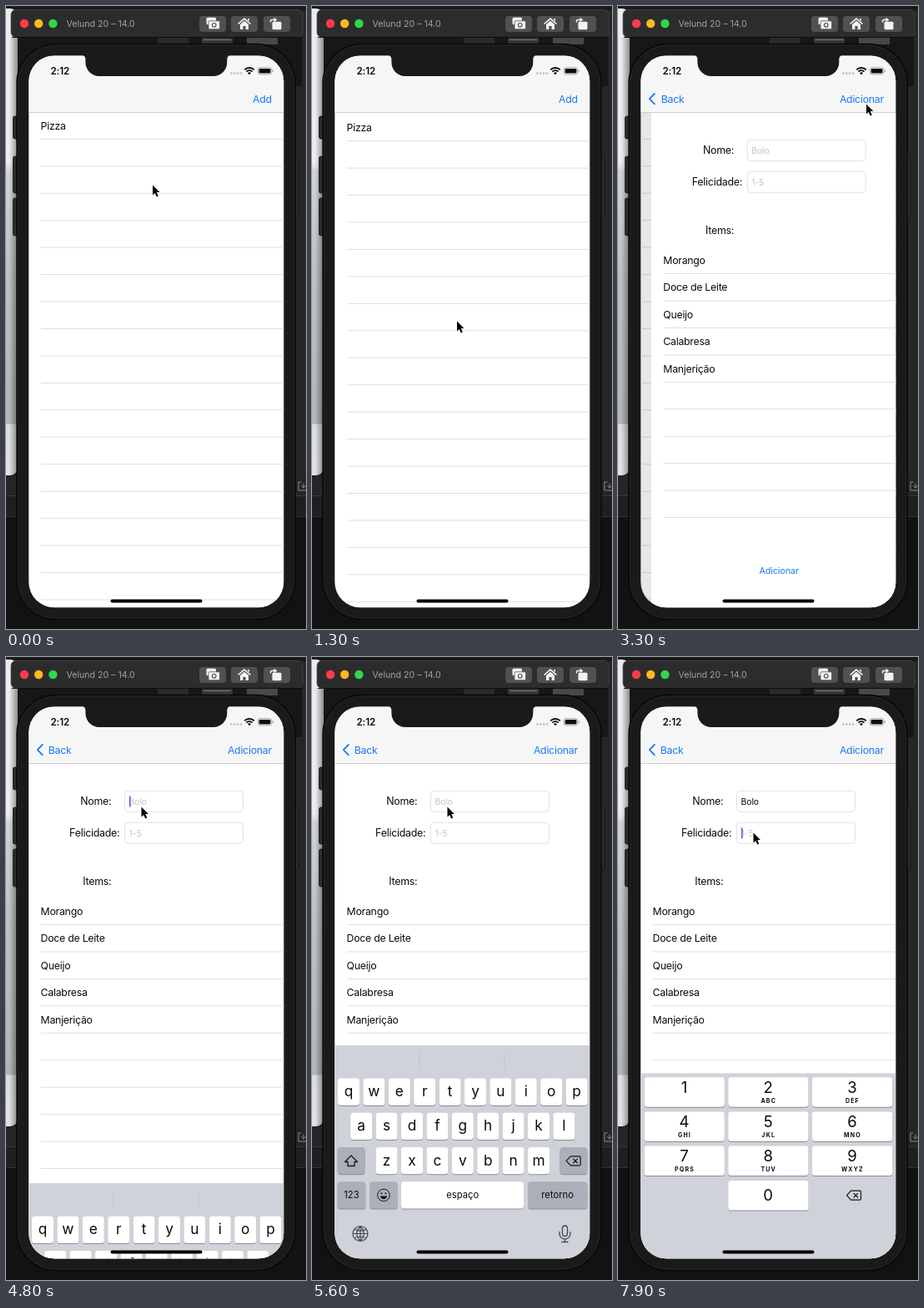
These frames come from a looping animation (360 px wide and 746 px high, 8 s). An HTML page with a canvas:

```html
<!DOCTYPE html>
<html lang="pt">
<head>
<meta charset="utf-8">
<title>Lista de comidas</title>
<style>
html, body { margin: 0; width: 100%; height: 100%; overflow: hidden; background: #111; }
canvas { display: block; width: 360px; height: 746px; }
</style>
</head>
<body>
<canvas id="stage" width="360" height="746"></canvas>
<script>
const ctx = document.getElementById('stage').getContext('2d');
const LOOP = 8000, STEP = 100;
const BLUE = '#1a7af0', LINE = '#dedee0', BODY = '#1a1a1a', INK = '#0b0b0b';
const SCREEN = { x: 27.3, y: 59.5, w: 306, h: 660.8 };
const ROW = 32.45;
const FOODS = ['Morango', 'Doce de Leite', 'Queijo', 'Calabresa', 'Manjerição'];
const KEY_ROWS = [['qwertyuiop', 31], ['asdfghjkl', 46.2], ['zxcvbnm', 76.6]];
const PAD = ['', 'ABC', 'DEF', 'GHI', 'JKL', 'MNO', 'PQRS', 'TUV', 'WXYZ'];

// Pointer stops: time, x, y
const POINTER = [
  [0, 176, 214], [250, 176, 214], [900, 174, 377], [1450, 174, 377],
  [2200, 252, 168], [2700, 298, 116], [2800, 298, 117], [3850, 298, 117],
  [4450, 162.5, 179], [7300, 162.5, 179], [7500, 162.5, 210], [LOOP, 162.5, 210]
];
const TYPED = [6000, 6350, 6650, 6950];
const PUSH = 2950, FOCUS_NAME = 4700, KEYBOARD = 4710, FOCUS_SCORE = 7700;

const clamp = v => Math.max(0, Math.min(1, v));
const smooth = v => v * v * (3 - 2 * v);
// Critically damped spring: 1 at the start, falling to 0
const spring = (ms, rate = 13.8) => {
  const k = Math.max(0, ms) / 1000 * rate;
  return (1 + k) * Math.exp(-k);
};

function box(x, y, w, h, r, fill, stroke, width = 1) {
  ctx.beginPath();
  ctx.roundRect(x, y, w, h, r);
  if (fill) { ctx.fillStyle = fill; ctx.fill(); }
  if (stroke) { ctx.strokeStyle = stroke; ctx.lineWidth = width; ctx.stroke(); }
}
function rect(x, y, w, h, fill) {
  ctx.fillStyle = fill;
  ctx.fillRect(x, y, w, h);
}
function disc(x, y, r, fill) {
  ctx.beginPath();
  ctx.arc(x, y, r, 0, 7);
  ctx.fillStyle = fill;
  ctx.fill();
}
function text(s, x, y, o = {}) {
  const { size = 12.3, color = INK, align = 'left', weight = 400, track = -0.25 } = o;
  ctx.font = `${weight} ${size}px Inter, Roboto, sans-serif`;
  ctx.letterSpacing = track + 'px';
  ctx.textAlign = align;
  ctx.fillStyle = color;
  ctx.fillText(s, x, y);
}
function path(d, x, y, { fill, stroke, width = 1.2 }) {
  const p = new Path2D(d);
  ctx.save();
  ctx.translate(x, y);
  ctx.lineCap = ctx.lineJoin = 'round';
  if (fill) { ctx.fillStyle = fill; ctx.fill(p); }
  if (stroke) { ctx.strokeStyle = stroke; ctx.lineWidth = width; ctx.stroke(p); }
  ctx.restore();
}
function shade(x0, y0, x1, y1, stops) {
  const g = ctx.createLinearGradient(x0, y0, x1, y1);
  stops.forEach(([at, color]) => g.addColorStop(at, color));
  return g;
}

function desktop() {
  rect(0, 0, 360, 746, '#121212');
  rect(0, 0, 360, 586, '#262626');
  rect(0, 0, 360, 5, '#1a1a1a');
  rect(5, 36, 350, 60, '#171717');
  rect(182, 37, 37, 9, '#2a2a2a');
  rect(235, 37, 37, 9, '#363636');
  rect(237, 40, 33, 1, '#7a7a7a');
  rect(289, 37, 37, 9, '#484848');
  rect(0, 562, 360, 24, '#252525');
  rect(0, 586, 360, 1, '#3b3b3b');
  rect(0, 587, 360, 24, '#1f1f1f');
  rect(0, 611, 360, 1, '#343434');
  box(-20, 3, 34, 559, 9, shade(0, 3, 0, 562, [
    [0, '#ececec'], [0.33, '#ededed'], [0.35, '#d2d3d4'], [0.55, '#bfc1c3'],
    [0.889, '#b3b5b7'], [0.891, '#dcdddd'], [1, '#e2e2e2']
  ]));
  rect(4, 37, 10, 525, shade(4, 0, 14, 0, [[0, '#0000'], [1, '#0006']]));
  path('M3 0H0V10H12M6 2V7M3.500 4.500L6 7L8.500 4.500', 351, 570, { stroke: '#8a8a8a', width: 1 });
}

function titleBar() {
  box(6, 4.5, 350, 33, 6, '#2d2c2d', '#4a4a4a', 0.8);
  rect(7, 37, 348, 1, '#0c0c0c');
  ['#fd3c4a', '#fdb924', '#30d848'].forEach((c, i) => disc(22 + i * 17.2, 21, 5.2, c));
  text('Velund 20 – 14.0', 72.5, 25, { size: 10.6, color: '#a3a2a3', track: 0 });
  [232, 270, 309].forEach(x => box(x, 12, 32, 19, 4, '#525152'));

  box(240.5, 13.8, 11.5, 8.5, 1.5, '#f2f2f2');
  box(243, 17.8, 13.5, 10, 1.5, '#f2f2f2', '#525152', 0.8);
  disc(249.7, 22.8, 2.9, '#525152');
  disc(249.7, 22.8, 1.7, '#f2f2f2');

  path('M0 7L8 0L16 7L14.800 8L8 2.200L1.200 8ZM3 8L8 3.800L13 8V14H9.600V10H6.400V14H3ZM12 1H14V4.200L12 2.500Z',
    278, 14, { fill: '#f2f2f2' });

  box(319.5, 18.8, 11, 9.5, 1.5, '#f2f2f2');
  path('M0 4V3Q0 1.500 2 1.500H5', 317.5, 15, { stroke: '#f2f2f2', width: 1.5 });
  path('M0 0L4 2.700L0 5.400Z', 321.5, 13.8, { fill: '#f2f2f2' });
}

function phoneBody() {
  [[132, 27], [180, 44], [230, 45]].forEach(([y, h]) => box(8.5, y, 7, h, 2, '#2b2b2b', '#111', 0.8));
  box(345, 180, 6, 74, 2, '#2b2b2b', '#111', 0.8);
  box(13, 45.5, 334, 689, 47, BODY, '#080808', 1.4);
  box(14.5, 47, 331, 686, 46, null, '#242424', 1);
}

function notch() {
  ctx.fillStyle = BODY;
  ctx.beginPath();
  ctx.moveTo(91, 58.5);
  ctx.quadraticCurveTo(95.4, 59.5, 95.4, 64);
  ctx.arcTo(95.4, 84, 112, 84, 16.5);
  ctx.arcTo(265.3, 84, 265.3, 67, 16.5);
  ctx.lineTo(265.3, 64);
  ctx.quadraticCurveTo(265.3, 59.5, 269.7, 58.5);
  ctx.fill();
}

function statusBar() {
  text('2:12', 53.5, 82, { size: 11.6, weight: 600, track: -0.1 });
  for (let i = 0; i < 4; i++) disc(270.4 + i * 3.9, 80.6, 1.4, '#c3c3c5');
  ctx.lineCap = 'butt';
  [[8.2, 1.8], [5.1, 1.7], [1.4, 2.8]].forEach(([r, w]) => {
    ctx.beginPath();
    ctx.arc(292, 82.2, r, -Math.PI * 0.75, -Math.PI * 0.25);
    ctx.strokeStyle = INK;
    ctx.lineWidth = w;
    ctx.stroke();
  });
  box(302.3, 73.6, 16.4, 8.3, 2.4, null, '#99999b', 0.8);
  box(303.6, 74.9, 13.8, 5.7, 1.3, INK);
  box(319.6, 76.3, 1.1, 3, 0.5, '#99999b');
}

function navBar(p) {
  rect(SCREEN.x, SCREEN.y, SCREEN.w, 127 - SCREEN.y, '#f6f6f6');
  rect(SCREEN.x, 127, SCREEN.w, 1, '#cdcdcf');
  const right = { color: BLUE, align: 'right' };
  ctx.globalAlpha = clamp(p * 2 - 1);
  text('Add', 318.8, 116, right);
  ctx.globalAlpha = clamp((1 - p) * 1.1 - 0.05);
  text('Adicionar', 318.8, 116, right);
  text('Back', 50.7 + 27 * p, 116, { color: BLUE });
  path('M6.500 0L0.500 6.200L6.500 12.400', 37.3, 105, { stroke: BLUE, width: 1.8 });
  ctx.globalAlpha = 1;
}

function rules(y, count, x) {
  for (let i = 0; i < count; i++) rect(x, y + i * ROW, 600, 1, LINE);
}

function foodList(pull, shift) {
  text('Pizza', 41.6 + shift, 148 + pull);
  rules(158.8 + pull, 18, 42 + shift);
}

function field(y, hint, value, focused, caretAlpha) {
  box(142.5, y, 142, 25, 4, '#fff', '#dededf', 0.9);
  text(value || hint, 147.6, y + 16.4, { size: 10.4, track: -0.1, color: value ? INK : '#c6c6c9' });
  if (!focused) return;
  const w = value ? ctx.measureText(value).width + 0.4 : 0;
  ctx.globalAlpha = caretAlpha;
  box(148 + w, y + 6, 1.5, 13.5, 0.7, '#4b5fe0');
  ctx.globalAlpha = 1;
}

function form(t, shift) {
  ctx.save();
  ctx.translate(shift, 0);
  rect(SCREEN.x, 128, SCREEN.w, 593, '#fff');
  const label = { size: 12.4 };
  text('Nome:', 89.2, 177.3, label);
  text('Felicidade:', 76.1, 215.4, label);
  text('Items:', 92.3, 273.2, label);

  const letters = TYPED.filter(at => t >= at).length;
  const marks = [FOCUS_NAME, ...TYPED, FOCUS_SCORE].filter(at => t >= at);
  const phase = (t - marks[marks.length - 1]) % 1000;
  const caret = phase < 550 ? 1 : clamp(1 - (phase - 550) / 120);
  const score = t >= FOCUS_SCORE;
  field(160.3, 'Bolo', 'Bolo'.slice(0, letters), t >= FOCUS_NAME && !score, caret);
  field(198.3, '1-5', '', score, caret);

  FOODS.forEach((name, i) => text(name, 41.6, 309 + i * ROW));
  rules(320, 10, 42);
  text('Adicionar', 180.5, 680.3, { size: 10.9, color: BLUE, align: 'center', track: -0.15 });
  ctx.restore();
}

function key(x, y, w, h, fill = '#fff') {
  box(x, y + 1, w, h, 3.6, '#8b8d92');
  box(x, y, w, h, 3.6, fill);
}
function eraseIcon(x, y) {
  path('M-3.500 -5.500H7Q8.500 -5.500 8.500 -4V4Q8.500 5.500 7 5.500H-3.500L-8.500 0ZM0 -2.300L4.600 2.300M4.600 -2.300L0 2.300',
    x, y, { stroke: '#17181a', width: 1.2 });
}

function letterKeys(top) {
  const y = n => top + 39.6 + n * 41.2, h = 32.3, dark = '#abafba';
  const label = (s, x) => text(s, x, y(3) + 20.2, { size: 11.2, align: 'center', track: 0 });
  [129, 231].forEach(x => rect(x - 0.5, top + 10, 1, 19, '#bcbfc6'));
  KEY_ROWS.forEach(([chars, x0], n) => [...chars].forEach((c, i) => {
    const x = x0 + i * 30.4;
    key(x, y(n), 26, h);
    text(c, x + 13, y(n) + 21.6, { size: 17.3, align: 'center', track: 0 });
  }));
  key(30.7, y(2), 32.8, h, dark);
  path('M0 -7L7.500 0.500H4V5.500H-4V0.500H-7.500Z', 47, y(2) + 17, { stroke: '#17181a', width: 1.3 });
  key(297.5, y(2), 32.8, h, dark);
  eraseIcon(313.7, y(2) + 16.4);

  key(30.7, y(3), 33.5, h, dark);
  label('123', 47.4);
  key(69, y(3), 33.5, h, dark);
  const cy = y(3) + 16.2;
  box(78.7, cy - 7.3, 14.6, 14.6, 7.3, null, '#17181a', 1);
  disc(83.5, cy - 2.2, 1, '#17181a');
  disc(88.5, cy - 2.2, 1, '#17181a');
  path('M-4.200 1.200H4.200Q3.300 4.800 0 4.800Q-3.300 4.800 -4.200 1.200Z', 86, cy, { fill: '#17181a' });
  key(107, y(3), 147, h);
  label('espaço', 180.7);
  key(259, y(3), 71.3, h, dark);
  label('retorno', 294.6);

  const by = top + 225.5;
  path('M-9 0A9 9 0 1 0 9 0A9 9 0 1 0 -9 0ZM0 -9V9M-9 0H9M0 -9Q-8.500 0 0 9M0 -9Q8.500 0 0 9M-7 -5Q0 -2 7 -5M-7 5Q0 2 7 5',
    58, by, { stroke: '#45484e', width: 1.15 });
  path('M-3 -6.500A3 3 0 0 1 3 -6.500V0A3 3 0 0 1 -3 0ZM-6.500 -2V0A6.500 6.500 0 0 0 6.500 0V-2M0 6.500V10M-3.500 10H3.500',
    303.5, by, { stroke: '#45484e', width: 1.3 });
}

function numberKeys(top) {
  const digit = (s, x, y) => text(s, x, y, { size: 18.5, align: 'center', track: 0 });
  PAD.forEach((hint, i) => {
    const x = 31.5 + (i % 3) * 100.7, y = top + 4.7 + Math.floor(i / 3) * 41.2;
    key(x, y, 96.3, 35.5);
    digit(String(i + 1), x + 48, y + 18.8);
    text(hint, x + 48.5, y + 30.6, { size: 7, weight: 700, align: 'center', track: 1.2 });
  });
  const y = top + 128.5;
  key(132.2, y, 96.3, 35.5);
  digit('0', 180.2, y + 24.4);
  eraseIcon(283, y + 17.7);
}

function keyboard(t) {
  if (t < KEYBOARD) return;
  const numeric = t >= FOCUS_SCORE;
  const top = numeric ? 498.5 : 465 + 255 * spring(t - KEYBOARD);
  rect(SCREEN.x, top, SCREEN.w, 300, '#d0d2d9');
  (numeric ? numberKeys : letterKeys)(top);
}

function pullAt(t) {
  const band = d => 660 * (1 - 1 / (d * 0.55 / 660 + 1));
  if (t <= 250) return 0;
  if (t <= 900) return band(pointerAt(t)[1] - 214);
  return band(163) * spring(t - 910);
}

function pointerAt(t) {
  const i = POINTER.findIndex((p, n) => n > 0 && t <= p[0]);
  const [t0, x0, y0] = POINTER[i - 1], [t1, x1, y1] = POINTER[i];
  const k = smooth((t - t0) / (t1 - t0));
  return [x0 + (x1 - x0) * k, y0 + (y1 - y0) * k];
}

function pointer(t) {
  const [x, y] = pointerAt(t);
  const arrow = 'M0 0V12L2.700 9.500L4.700 14L6.700 13.100L4.800 8.700H8.400Z';
  path(arrow, x, y + 0.4, { stroke: '#fff', width: 2 });
  path(arrow, x, y + 0.4, { fill: '#000' });
}

function draw(t) {
  const pushed = t >= PUSH;
  let p = pushed ? spring(t - PUSH, 14.2) : 1;
  if (p < 0.001) p = 0;

  desktop();
  phoneBody();
  titleBar();

  ctx.save();
  box(SCREEN.x, SCREEN.y, SCREEN.w, SCREEN.h, 30.6, '#fff');
  ctx.clip();
  if (p > 0) foodList(pullAt(t), -92 * (1 - p));
  if (pushed) {
    rect(SCREEN.x, 128, SCREEN.w, 593, `rgba(0,0,0,${0.1 * (1 - p)})`);
    form(t, SCREEN.w * p);
  }
  navBar(p);
  statusBar();
  keyboard(t);
  box(125.5, 710.6, 110, 3.8, 1.9, '#050505');
  ctx.restore();
  notch();
  pointer(t);
}

function tick() {
  const t = performance.now() % LOOP;
  draw(Math.floor(t / STEP) * STEP);
  requestAnimationFrame(tick);
}
tick();
</script>
</body>
</html>
```
